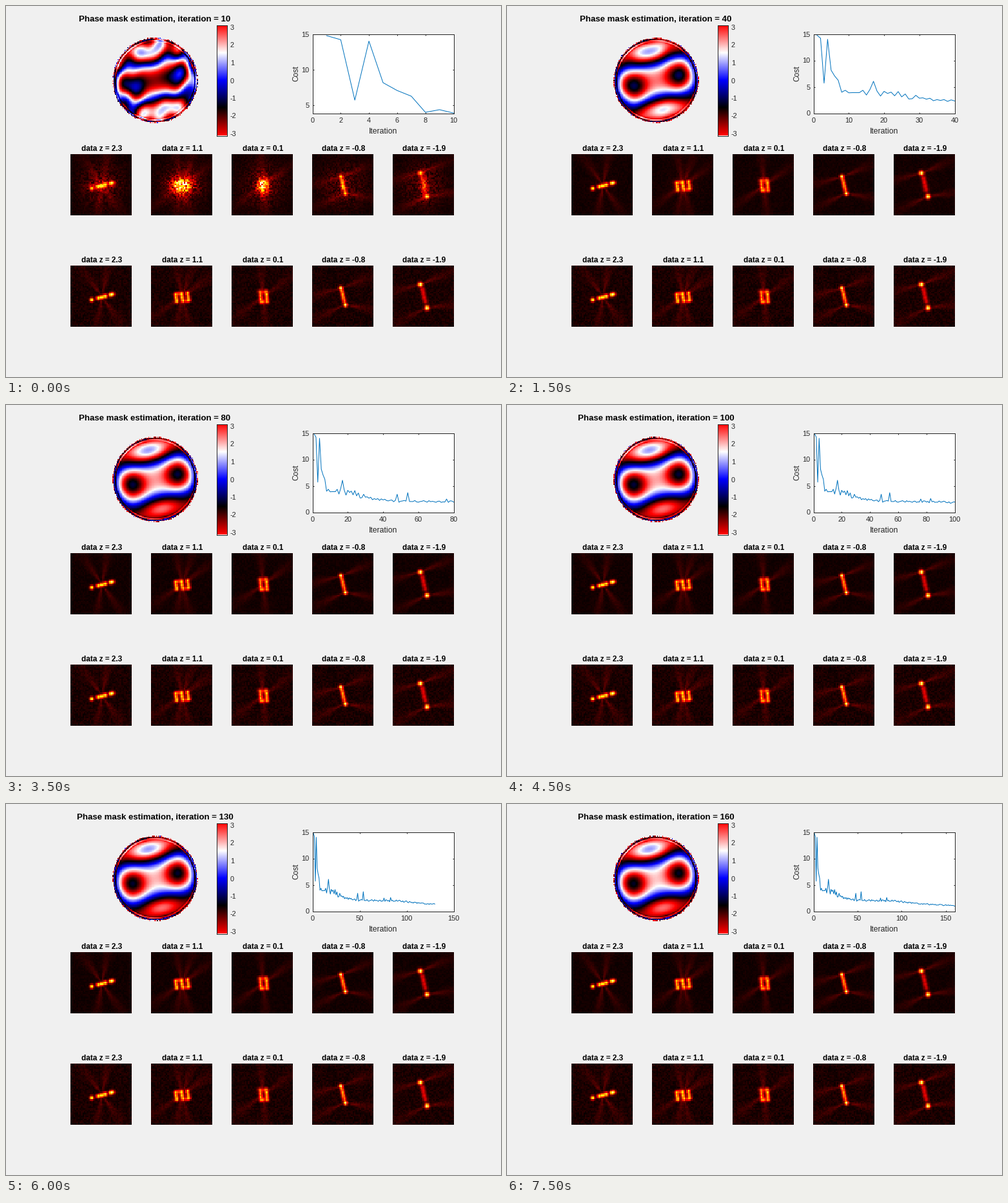
Recreate the animation shown at these times as a matplotlib script. Size 768 px wide and 576 px high, loop 8 s.

```python
import numpy as np
import matplotlib.pyplot as plt
from matplotlib.animation import FuncAnimation
from matplotlib.colors import LinearSegmentedColormap

W, H, DPI = 768, 576, 96
FRAMES, STEP = 16, 10
INK = "#262626"

plt.rcParams["font.family"] = "Liberation Sans"
fig = plt.figure(figsize=(W / DPI, H / DPI), dpi=DPI, facecolor="#f0f0f0")


def panel(x, y, w, h):
    return fig.add_axes([x / W, 1 - (y + h) / H, w / W, h / H])


def label(x, y, text, size, color=INK, ha="center", va="baseline", **kw):
    return fig.text(x / W, 1 - y / H, text, fontsize=size, color=color,
                    ha=ha, va=va, **kw)


def bell(x, y=0):
    return np.exp(-(x ** 2 + y ** 2) / 2)


def fade(it, span):
    return np.exp(-(it - STEP) / span)


# --- phase mask -----------------------------------------------------------
CYCLIC = LinearSegmentedColormap.from_list(
    "cyclic", ["red", "black", "blue", "white", "red"], N=256)
N_MASK, VIEW, RADIUS = 128, 173, 66
TILT = np.radians(13)

t = ((np.arange(N_MASK) + 0.5) / N_MASK - 0.5) * VIEW / RADIUS
mx, my = np.meshgrid(t, -t)
ma = mx * np.cos(TILT) + my * np.sin(TILT)
mb = my * np.cos(TILT) - mx * np.sin(TILT)
mr = np.hypot(ma, mb)
mt = np.arctan2(mb, ma)


def phase_mask(it):
    rng = np.random.default_rng(it)
    bridge = 0.35 * np.clip(1.6 - it / 100, 0, 1) + 1.65 * fade(it, 14)
    lower = np.interp(it, [10, 40, 60], [7.0, 6.6, 5.5])

    p = 1.8 + bridge * bell(ma / 0.5, mb / 0.25)
    for side in (-1, 1):
        p += 3.3 * bell((ma + side * 0.56) / 0.21, mb / 0.21)
    for side, depth in ((1, 7.0), (-1, lower)):
        p -= depth * bell(ma / 0.5, (mb - side * 0.7) / 0.22)
    p -= 1.8 * (mr / 0.86) ** 6 * (0.25 + 0.75 * np.cos(mt) ** 2)

    # uneven rings and speckle along the rim
    rim = np.clip((mr - 0.88) / 0.08, 0, 1)
    wave = np.sin(2 * np.pi * (mr - 0.88) / 0.07)
    p += rim * (1.5 + 0.5 * np.sin(3 * mt + 1)) * wave
    p += np.clip((mr - 0.94) / 0.06, 0, 1) * rng.normal(0, 0.8, mr.shape)

    lumps = np.sin(9 * ma + 2) * np.cos(8 * mb - 1) + 0.6 * np.sin(13 * ma - 7 * mb)
    p += fade(it, 14) * lumps * 1.3 * np.clip(mr, 0, 1) ** 1.5

    p = (p + np.pi) % (2 * np.pi) - np.pi
    p[mr > 1 + rng.uniform(-0.012, 0.012, mr.shape)] = np.nan
    return p


mask_ax = panel(231 - VIEW / 2, 115.5 - VIEW / 2, VIEW, VIEW)
mask_ax.axis("off")
mask_im = mask_ax.imshow(phase_mask(STEP), cmap=CYCLIC, vmin=-np.pi, vmax=np.pi,
                         interpolation="nearest", aspect="auto")
title = label(231, 24, "", 9.9, "black", weight="bold")

bar_ax = panel(326.5, 29.5, 16, 172)
bar_ax.imshow(np.linspace(np.pi, -np.pi, 256)[:, None], cmap=CYCLIC, aspect="auto")
bar_ax.set(xticks=[], yticks=[])
for v in range(-3, 4):
    label(348, 115.5 - 27.5 * v, str(v), 8.25, ha="left", va="center_baseline")


# --- cost curve -----------------------------------------------------------
HEAD = [14.77, 14.2, 5.7, 14, 8.15, 7.05, 6.25, 3.98, 4.35, 3.87,
        3.9, 3.9, 3.9, 4.35, 3.45, 4.5, 6.05, 4.2, 3.25, 4.15,
        3.75, 4, 3.3, 4.1, 3.1, 3.65, 2.7, 2.75, 3.4, 2.85]


def cost_curve():
    n = np.arange(len(HEAD) + 1, STEP * FRAMES + 1)
    rng = np.random.default_rng(4)
    tail = np.interp(n, [31, 46, 90, 128, 160], [2.7, 2.05, 1.95, 1.35, 1.05])
    tail += rng.uniform(-0.25, 0.25, n.size) * (1.1 - n / 250)
    for at, peak in ((48, 3.4), (54, 3.7), (76, 2.5), (83, 2.6)):
        tail[n == at] = peak
    return np.concatenate([HEAD, tail])


COST = cost_curve()
cost_ax = panel(475.5, 43.5, 219, 123)
curve, = cost_ax.plot([], [], color="#0072bd", lw=0.75)
cost_ax.tick_params(direction="in", top=True, right=True, length=1.8, width=0.75,
                    color=INK, labelcolor=INK, labelsize=8.25)
cost_ax.tick_params(axis="x", pad=4.6)
cost_ax.tick_params(axis="y", pad=3.6)
for ax in (bar_ax, cost_ax):
    for s in ax.spines.values():
        s.set(linewidth=0.75, color=INK)
label(585.5, 198, "Iteration", 9.2)
label(450, 105, "Cost", 9, va="center", rotation=90)


def cost_range(it):
    if it <= 10:
        return it, 2
    if it <= 30:
        return it, 5
    if it <= 70:
        return it, 10
    if it <= 120:
        return -(-it // 20) * 20, 20
    return max(it, 150), 50


# --- spot images ----------------------------------------------------------
SIDE, N_SPOT = 95, 41
DEPTHS = ["2.3", "1.1", "0.1", "-0.8", "-1.9"]
s = (np.arange(N_SPOT) + 0.5) * SIDE / N_SPOT
sx, sy = np.meshgrid(s, s)


def dots(start, end, count, level, sigma=2.1):
    """Evenly spaced soft dots from start to end."""
    return sum(level * bell((sx - x) / sigma, (sy - y) / sigma)
               for x, y in np.linspace(start, end, count))


def rays(x, y, *angles):
    """Faint beams leaving a point."""
    r = np.hypot(sx - x, sy - y)
    phi = np.arctan2(sy - y, sx - x)
    fan = sum(bell(np.angle(np.exp(1j * (phi - np.radians(a)))) / 0.13) for a in angles)
    return 0.15 * fan * np.exp(-r / 30) * np.clip(r / 10, 0, 1)


def ladder(top, bottom, gap, count, bars, level):
    """Parallel slanted rows of dots."""
    gap = np.array(gap)
    return sum(dots(top + k * gap, bottom + k * gap, count, level) for k in range(bars))


SPOTS = [
    dots((33, 53.5), (33, 53.5), 1, 0.85) + dots((43, 51), (54, 48), 3, 0.78)
    + dots((62, 46), (65.5, 45), 2, 0.65),
    ladder((38, 45.5), (40, 56), (9.3, -1), 3, 3, 0.62)
    + dots((42.5, 44), (55, 55), 2, 0.35),
    ladder((44, 41.5), (46, 57), (9.3, -0.5), 4, 2, 0.55)
    + dots((49, 42), (50, 56), 2, 0.25),
    dots((44.5, 35.5), (51.5, 61.5), 2, 0.95) + dots((46, 41), (50, 55.5), 4, 0.52),
    dots((43, 30), (53, 66), 2, 0.95, 2.5) + dots((46, 38), (50.5, 56), 4, 0.3, 2.5),
]
BEAMS = [
    rays(49, 49, -125, -80, 100, 55),
    rays(48, 49, -35, -70, -100, 75, 100, 145),
    rays(49, 49, -95, -35, 145, 85),
    rays(45, 36, -22, 165) + rays(51, 61, 155, 10),
    rays(43, 30, -22, 165) + rays(53, 66, 155, -8),
]
BLURS = [(14, 5), (12, 9), (6, 9), (3.5, 8), (4, 14)]


def spot_image(view, seed, early=0.0, noise=0.025):
    rng = np.random.default_rng(seed)
    img = SPOTS[view]
    if early > 0.01:
        grain = rng.uniform(0, 1, sx.shape)
        bx, by = BLURS[view]
        dx, dy = sx - 48.5, sy - 49
        mix = early * (0.75 if view in (1, 2) else 0.25)
        img = img * (1 - mix) * (1 - 0.5 * early * (grain - 0.5))
        img = img + mix * bell(dx / bx, dy / by) * (0.2 + grain)
        img += 0.16 * early * bell(dx / 24, dy / 24) * grain
    return np.clip(img + BEAMS[view] + noise * rng.uniform(0, 1, sx.shape), 0, 1)


def spot_panel(view, y, img):
    x = 100 + 125 * view
    ax = panel(x, y, SIDE, SIDE)
    ax.axis("off")
    label(x + 48.5, y - 5.5, f"data z = {DEPTHS[view]}", 8.8, "black", weight="bold")
    return ax.imshow(img, cmap="hot", vmin=0, vmax=1,
                     interpolation="nearest", aspect="auto")


fits = []
for v in range(len(DEPTHS)):
    fits.append(spot_panel(v, 230.5, spot_image(v, v)))
    spot_panel(v, 403.5, spot_image(v, 50 + v, noise=0.05))


def draw(i):
    it = STEP * (i + 1)
    title.set_text(f"Phase mask estimation, iteration = {it}")
    mask_im.set_data(phase_mask(it))

    curve.set_data(np.arange(1, it + 1), COST[:it])
    top, step = cost_range(it)
    first = it == STEP
    cost_ax.set_xticks(range(0, top + 1, step))
    cost_ax.set_xlim(0, top)
    cost_ax.set_yticks(range(5 if first else 0, 16, 5))
    cost_ax.set_ylim(3.85 if first else 0, 15)

    for v, im in enumerate(fits):
        im.set_data(spot_image(v, 100 * it + v, early=fade(it, 13)))
    return []


anim = FuncAnimation(fig, draw, frames=FRAMES, interval=500,
                     init_func=lambda: [], repeat=True)
plt.show()
```
